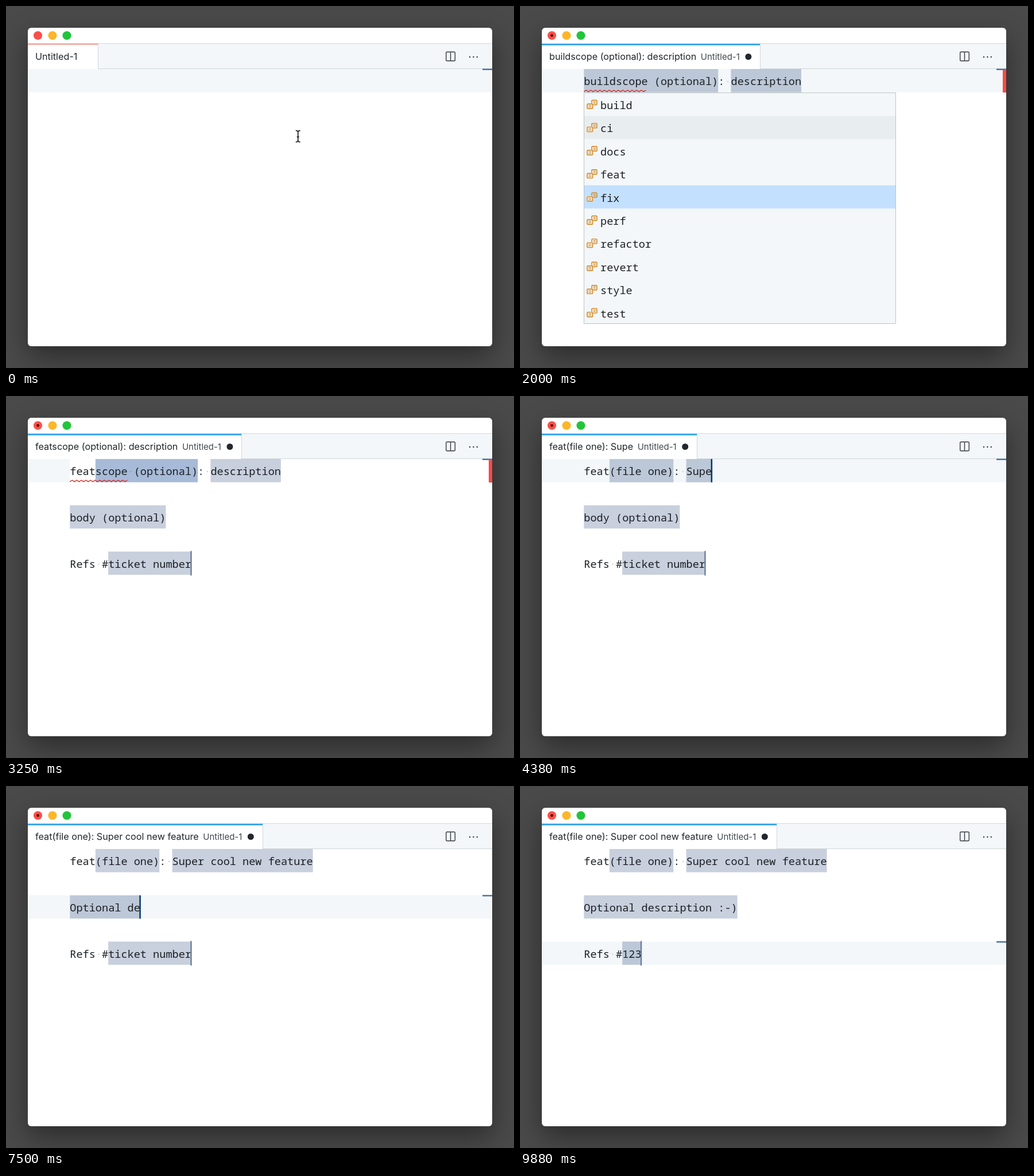
Write an HTML page with a canvas that moves like this. It is 885x632 px and loops after 10 s.

```html
<!DOCTYPE html>
<html lang="en">
<head>
<meta charset="utf-8">
<title>Commit snippet</title>
<style>
  html, body { margin: 0; width: 100%; height: 100%; overflow: hidden; background: #4a4a4a; }
  canvas { display: block; }
</style>
</head>
<body>
<canvas id="stage" width="885" height="632"></canvas>
<script>
const ctx = document.getElementById('stage').getContext('2d');
const LOOP = 10000, TICK = 125;
const LEFT = 111.3, TOP = 110, CHAR = 11.14, ROW = 40.4;
const MONO = '18.57px "Noto Sans Mono", "DejaVu Sans Mono", monospace';
const TITLE = '16.2px Inter, "Open Sans", sans-serif';
const LABEL = '15px Inter, "Open Sans", sans-serif';
const INK = '#1c2024', TINT = '#f3f7f9';
const KINDS = ['build', 'ci', 'docs', 'feat', 'fix', 'perf', 'refactor', 'revert', 'style', 'test'];
const SNIPPETS = ['commit', 'commit-body', 'commit-refs'];

// Key points are [time, typed characters]; typing is linear between them.
const TYPING = {
  trigger: ['comm', [[375, 1], [750, 4]]],
  scope: ['(file one)', [[3500, 1], [3625, 1], [4125, 10]]],
  desc: ['Super cool new feature',
    [[4250, 1], [4375, 4], [4625, 6], [4750, 8], [5375, 15], [5500, 15], [6125, 22]]],
  body: ['Optional description :-)', [[6500, 1], [6875, 1], [7500, 11], [8000, 16], [8750, 24]]],
  ticket: ['123', [[9250, 1], [9500, 2], [9875, 3]]]
};

// Which field has the focus from a given time, and whether it is selected.
const FOCUS = [
  [0, ''], [375, 'trigger'], [1250, 'type', true], [1750, ''], [2750, 'type'],
  [3000, 'scope', true], [3500, 'scope'], [4250, 'desc'], [6250, 'body', true],
  [6500, 'body'], [9000, 'ticket', true], [9250, 'ticket']
];

function along(points, t) {
  let [t0, v0] = points[0];
  for (const [t1, v1] of points) {
    if (t < t1) return v0 + (v1 - v0) * (t - t0) / (t1 - t0);
    [t0, v0] = [t1, v1];
  }
  return v0;
}

function typed(name, t, placeholder) {
  const [text, points] = TYPING[name];
  return t < points[0][0] ? placeholder : text.slice(0, Math.floor(along(points, t) + 1e-6));
}

function linesAt(t) {
  if (t < 1250) return [[{ id: 'trigger', text: typed('trigger', t, '') }]];
  return [
    [
      { id: 'type', text: t < 2750 ? 'build' : 'feat', stop: t < 2750 },
      { id: 'scope', text: typed('scope', t, 'scope (optional)'), stop: true },
      { text: ': ', dot: 1 },
      { id: 'desc', text: typed('desc', t, 'description'), stop: true }
    ],
    [],
    [{ id: 'body', text: typed('body', t, 'body (optional)'), stop: true }],
    [],
    [
      { text: 'Refs #', dot: 4 },
      { id: 'ticket', text: typed('ticket', t, 'ticket number'), stop: true, last: true }
    ]
  ];
}

function box(x, y, w, h, color) {
  ctx.fillStyle = color;
  ctx.fillRect(x, y, w, h);
}

function disc(x, y, r, color) {
  ctx.fillStyle = color;
  ctx.beginPath();
  ctx.arc(x, y, r, 0, Math.PI * 2);
  ctx.fill();
}

function stroke(points, color, width) {
  ctx.strokeStyle = color;
  ctx.lineWidth = width;
  ctx.beginPath();
  points.forEach(([x, y]) => ctx.lineTo(x, y));
  ctx.stroke();
}

function frame(x, y, w, h, r, color, width) {
  ctx.strokeStyle = color;
  ctx.lineWidth = width;
  ctx.beginPath();
  ctx.roundRect(x, y, w, h, r);
  ctx.stroke();
}

function mono(text, x, y) {
  ctx.font = MONO;
  ctx.fillStyle = INK;
  [...text].forEach((c, i) => ctx.fillText(c, x + i * CHAR, y));
}

function label(text, x, font, color) {
  ctx.font = font;
  ctx.fillStyle = color;
  ctx.fillText(text, x, 93.5);
  return x + ctx.measureText(text).width;
}

function drawWindow(dirty) {
  box(0, 0, 885, 632, '#4a4a4a');
  ctx.save();
  ctx.shadowColor = 'rgba(0,0,0,.42)';
  ctx.shadowBlur = 48;
  ctx.shadowOffsetY = 18;
  ctx.fillStyle = '#fff';
  ctx.beginPath();
  ctx.roundRect(38, 38, 809, 556, 6);
  ctx.fill();
  ctx.restore();
  disc(55.5, 51.5, 7.6, '#fb5049');
  disc(81, 51.5, 7.6, '#fcb62b');
  disc(106, 51.5, 7.6, '#22c43b');
  if (dirty) disc(55.5, 51.5, 2.4, '#4d0906');
}

function drawTabs(title, dirty) {
  box(38, 65, 809, 45, TINT);
  box(38, 65, 809, 1, '#d3dadd');
  box(38, 109, 809, 1, '#d0d7da');

  ctx.font = TITLE;
  const titleW = ctx.measureText(title).width;
  ctx.font = LABEL;
  const labelX = 51 + titleW + 7.5;
  const end = dirty ? labelX + ctx.measureText('Untitled-1').width : 51 + titleW;
  const edge = Math.round(end + 35.5);
  box(38, 66, edge - 38, 44, '#fff');
  box(edge, 66, 1, 44, '#d0d7da');
  box(38, 66, edge - 38, dirty ? 2.6 : 1.3, dirty ? '#2f9fe8' : '#ec7b6d');
  label(title, 51, TITLE, '#20262b');
  if (dirty) {
    label('Untitled-1', labelX, LABEL, '#3f474c');
    disc(end + 15, 88.5, 5.5, '#22282d');
  }

  frame(766.7, 80.2, 15.6, 15.6, 1.5, '#343b40', 1.4);
  stroke([[774.5, 80], [774.5, 96]], '#343b40', 1.4);
  for (let i = 0; i < 3; i++) disc(808 + i * 6.4, 89, 1.2, '#343b40');
}

function drawRow(segs, index, active, focus, selected) {
  const y = TOP + index * ROW;
  if (active) {
    box(38, y, selected ? 73 : 809, ROW + .3, TINT);
    box(830, y - .5, 17, 2.3, '#44699f');
  }
  let x = LEFT;
  for (const seg of segs) {
    const w = seg.text.length * CHAR;
    const focused = seg.id && seg.id === focus;
    const chosen = focused && selected;
    if (chosen || seg.stop) {
      box(x, y, w, ROW + .2, chosen ? '#a7bbd8' : active && !selected ? '#bcc8d7' : '#c8cfdd');
    }
    mono(seg.text, x, y + 28);
    const space = chosen ? seg.text.indexOf(' ') : -1;
    const dot = seg.dot || space;
    if (dot > 0) disc(x + (dot + .5) * CHAR, y + 22, 1.1, chosen ? '#8497b5' : '#bcc4c9');
    x += w;
    if (seg.last) box(x - 1.7, y - 1, 2.4, ROW + 2.4, '#697f9b');
    else if (focused && !selected) box(x - 1.5, y, 2.5, ROW + .3, '#06386f');
  }
}

function drawError(chars) {
  const wave = [];
  for (let x = 0, i = 0; x <= chars * CHAR; x += 4, i++) wave.push([LEFT + x, i % 2 ? 147 : 149.6]);
  stroke(wave, '#d3271f', 1.3);
  box(841, 112, 6, 39, '#fb4a43');
}

function enumIcon(x, y) {
  const color = '#d17b0b';
  frame(x + 8.5, y, 9, 8, 1, color, 1.4);
  stroke([[x + 11, y + 2.7], [x + 15.5, y + 2.7]], color, 1.1);
  stroke([[x + 11, y + 5.2], [x + 15.5, y + 5.2]], color, 1.1);
  box(x - .8, y + 5.3, 11.6, 10, TINT);
  frame(x + .5, y + 6.5, 9.5, 8.2, 1, color, 1.4);
  stroke([[x + 2.7, y + 9.2], [x + 7.8, y + 9.2]], color, 1.1);
  stroke([[x + 2.7, y + 11.9], [x + 7.8, y + 11.9]], color, 1.1);
}

function snippetIcon(x, y) {
  ctx.setLineDash([2, 2]);
  frame(x + 2, y + 1, 13, 13, 0, '#444c52', 1.3);
  ctx.setLineDash([]);
}

function drawList(x, items, current, icon) {
  const h = items.length * ROW;
  box(x, 151, 543.5, h, TINT);
  items.forEach((item, i) => {
    const y = 151.5 + i * ROW;
    if (i === current) box(x, y, 543.5, ROW, '#c3e0fe');
    else if (i === 1) box(x, y, 543.5, ROW, '#e8edf0');
    icon(x + 5.2, y + 13);
    mono(item, x + 28.7, y + 28.5);
  });
  frame(x + .2, 151.5, 543, h - 1, 0, '#bcc3c1', 1);
}

function drawPointer(x, y) {
  for (const [color, width] of [['#fff', 3.5], ['#1c1c1c', 1.7]]) {
    for (const s of [-1, 1]) {
      stroke([[x - 4, y + 10 * s], [x - 1.5, y + 9.7 * s], [x, y + 8 * s],
        [x + 1.5, y + 9.7 * s], [x + 4, y + 10 * s]], color, width);
    }
    stroke([[x, y - 8.5], [x, y + 8.5]], color, width);
    stroke([[x - 2, y + 1], [x + 2, y + 1]], color, width);
  }
}

function draw(time) {
  const t = Math.floor(time / TICK) * TICK;
  const dirty = t >= 375;
  const [, focus, selected] = FOCUS.filter(f => f[0] <= t).pop();
  const lines = linesAt(t);
  const activeRow = { body: 2, ticket: 4 }[focus] || 0;

  // The tab label follows a changed snippet one tick later.
  const late = t === 1250 || t === 2750;
  const heading = linesAt(late ? t - TICK : t)[0].map(s => s.text).join('');

  drawWindow(dirty);
  drawTabs(heading || 'Untitled-1', dirty);
  lines.forEach((segs, i) => drawRow(segs, i, i === activeRow, focus, selected));

  if (t >= 1375 && t < 3500) drawError(lines[0][0].text.length + 5);
  if (t >= 500 && t < 1250) {
    drawList(LEFT + lines[0][0].text.length * CHAR, SNIPPETS, 0, snippetIcon);
  }
  if (t >= 1750 && t < 2750) {
    const step = Math.floor(along([[1750, 0], [2000, 4], [2500, 13]], t) + 1e-6);
    drawList(LEFT, KINDS, step % KINDS.length, enumIcon);
  }
  if (!dirty) drawPointer(508.7, 227.5);
}

const start = performance.now();
function tick() {
  draw((performance.now() - start) % LOOP);
  requestAnimationFrame(tick);
}
tick();
</script>
</body>
</html>
```
